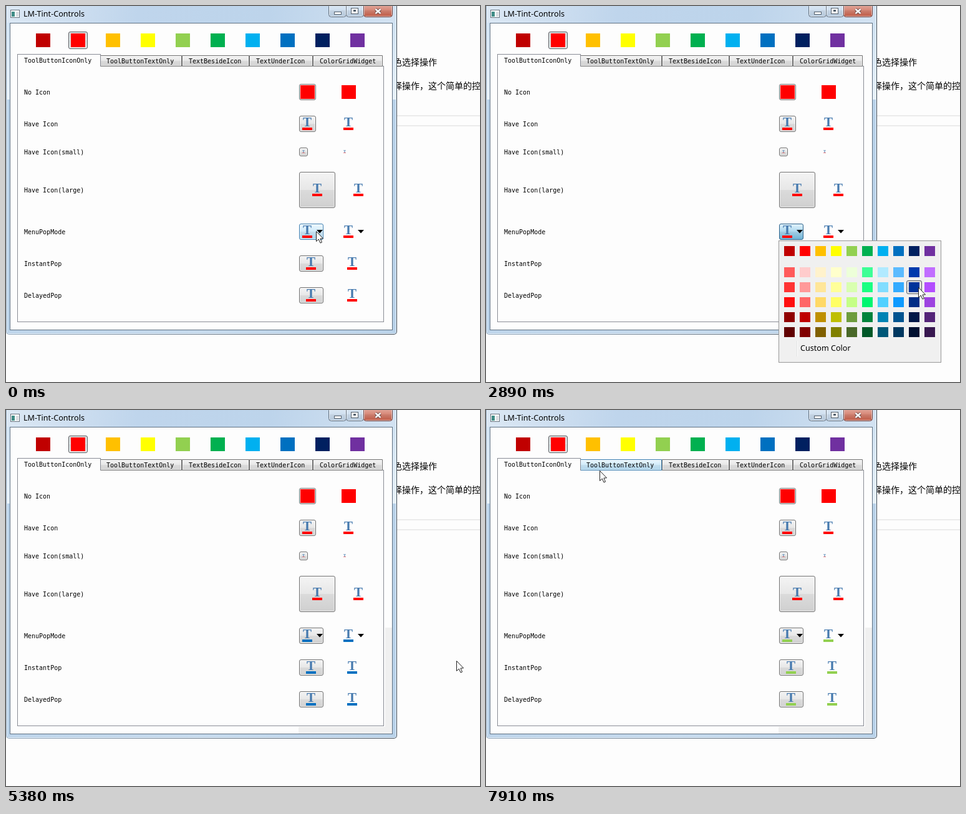
These frames come from a looping animation (760x603 px, 8000 ms). An HTML page with a canvas:

```html
<!DOCTYPE html>
<html lang="en">
<head>
<meta charset="utf-8">
<title>Color tool buttons</title>
<style>
html, body { margin: 0; width: 760px; height: 603px; overflow: hidden; background: #fdfdfd; }
canvas { display: block; }
</style>
</head>
<body>
<canvas id="stage" width="760" height="603"></canvas>
<script>
const c = document.getElementById('stage').getContext('2d');
const LOOP = 8000;
const MONO = '10px "DejaVu Sans Mono", monospace';
const SANS = '12.6px "Noto Sans", sans-serif';
const CJK = '14px "Noto Sans CJK SC", "Noto Sans CJK", sans-serif';

// ---- colours ----
const base = ['#c00000', '#ff0000', '#ffc000', '#ffff00', '#92d050',
  '#00b050', '#00b0f0', '#0070c0', '#002060', '#7030a0'];

// Scale the HSV value; overflow above full brightness lowers the saturation.
function shade(hex, factor) {
  const rgb = [1, 3, 5].map(i => parseInt(hex.slice(i, i + 2), 16));
  const max = Math.max(...rgb), min = Math.min(...rgb);
  let v = max * factor, s = 1 - min / max;
  if (v > 255) { s = Math.max(0, s - (v - 255) / 255); v = 255; }
  return `rgb(${rgb.map(k => Math.round(v * (1 - s * (max - k) / (max - min))))})`;
}
const grid = [1, 1.8, 1.6, 1.4, 0.75, 0.5].map(f => base.map(h => shade(h, f)));

// Edge, top and bottom colour of each control state.
const skins = {
  normal: ['#707070', '#f4f4f4', '#dadada'],
  hot: ['#3c7fb1', '#eef8fe', '#b2def8'],
  down: ['#2c628b', '#e5f4fc', '#72bce2'],
  flatHot: ['#b4b8bc', '#fdfdfd', '#f6f6f6'],
  flatDown: ['#5c6166', '#d8d8d8', '#f4f4f4'],
  caption: ['#5d6d7e', '#e0ebf6', '#bdd2e7'],
  close: ['#6a3a38', '#e5b3a8', '#c85a44']
};

// ---- layout: seven rows, 25 px apart ----
const rows = [['No Icon', 26], ['Have Icon', 26], ['Have Icon(small)', 14],
  ['Have Icon(large)', 58], ['MenuPopMode', 26], ['InstantPop', 26], ['DelayedPop', 26]]
  .map(([label, h]) => ({ label, h }));
rows.reduce((y, row) => { row.y = y; return y + row.h + 25; }, 125);
const [plain, medium, small, large, menu, instant, delayed] = rows;

// ---- timeline ----
// Pointer glides: first and last change, number of steps, end point, optional bend.
const glides = [
  [810, 810, 1, [503, 366]],
  [1240, 1240, 1, [512, 395]],
  [1380, 2200, 7, [632, 409], [490, 620]],
  [2320, 2750, 4, [693, 451]],
  [3040, 3040, 1, [686, 439]],
  [3470, 3750, 3, [566, 367]],
  [4450, 4840, 4, [711, 394], [620, 394]],
  [4990, 4990, 1, [727, 394]],
  [5380, 5380, 1, [722, 402]],
  [5530, 5930, 4, [562, 420]],
  [6490, 6920, 4, [648, 451], [590, 455]],
  [7070, 7490, 4, [345, 161]],
  [7640, 7910, 3, [182, 97]]
];

function pointerAt(t) {
  let at = [497, 361];
  for (const [first, last, steps, end, bend] of glides) {
    if (t < first) break;
    const gap = (last - first) / (steps - 1) || 1;
    const u = Math.min(steps, Math.floor((t - first) / gap + 0.01) + 1) / steps;
    at = at.map((from, i) => {
      const mid = bend ? bend[i] : (from + end[i]) / 2;
      return Math.round((1 - u) ** 2 * from + 2 * u * (1 - u) * mid + u * u * end[i]);
    });
  }
  return at;
}

const popups = [
  { row: menu, x: 470, press: 530, open: 670, pick: 2890, close: 3040, cell: [2, 8] },
  { row: menu, x: 535, press: 4060, open: 4180, pick: 5120, close: 5250, cell: [0, 7] },
  { row: instant, x: 535, press: 6070, open: 6190, pick: 7070, close: 7070, cell: [0, 4] }
];

// ---- drawing helpers ----
function fill(x, y, w, h, style) { c.fillStyle = style; c.fillRect(x, y, w, h); }

function frame(x, y, w, h, style) {
  c.strokeStyle = style; c.lineWidth = 1;
  c.strokeRect(x + 0.5, y + 0.5, w - 1, h - 1);
}

function ramp(x0, y0, x1, y1, ...colors) {
  const g = c.createLinearGradient(x0, y0, x1, y1);
  colors.forEach((color, i) => g.addColorStop(i / (colors.length - 1), color));
  return g;
}

function text(str, x, y, font, color = '#000', align = 'left') {
  c.font = font; c.fillStyle = color; c.textAlign = align;
  c.fillText(str, x, y);
}

function shape(points, color, edge) {
  c.beginPath();
  points.forEach(p => c.lineTo(...p));
  c.closePath();
  c.fillStyle = color; c.fill();
  if (edge) { c.strokeStyle = edge; c.lineWidth = 1; c.stroke(); }
}

// Glossy control: a vertical ramp with a darker lower half.
function button(x, y, w, h, skin, radius = 2.5) {
  const [edge, top, bottom] = skins[skin];
  c.beginPath(); c.roundRect(x + 0.5, y + 0.5, w - 1, h - 1, radius);
  c.fillStyle = ramp(0, y, 0, y + h, top, bottom); c.fill();
  const half = Math.floor(h / 2);
  fill(x + 1, y + half, w - 2, h - half - 1, 'rgba(0,0,0,.05)');
  if (skin !== 'down' && skin !== 'flatDown') frame(x + 1, y + 1, w - 2, h - 2, 'rgba(255,255,255,.6)');
  c.beginPath(); c.roundRect(x + 0.5, y + 0.5, w - 1, h - 1, radius);
  c.strokeStyle = edge; c.lineWidth = 1; c.stroke();
}

// Letter with an underline in the chosen colour; y is the top of the button.
function icon(cx, y, color) {
  text('T', cx, y + 17, 'bold 21px "Liberation Serif", serif', '#4579ae', 'center');
  fill(cx - 8, y + 19, 16, 4, color);
}

function tinyIcon(cx, y) {
  text('T', cx, y + 8, 'bold 6px "Liberation Serif", serif', '#4579ae', 'center');
  fill(cx - 2, y + 8, 4, 1, '#f08080');
}

// ---- scene parts ----
function page() {
  fill(0, 0, 760, 603, '#fdfdfd');
  text('色选择操作', 621, 95, CJK);
  text('择操作，这个简单的控', 621, 133, CJK);
  for (const y of [175, 191]) fill(627, y, 133, 2, '#ebebeb');
}

function windowFrame(repainted) {
  c.beginPath(); c.roundRect(0, -8, 627, 535, 5);
  c.fillStyle = ramp(0, 0, 627, 0, '#8fa5ba', '#3e4a56'); c.fill();
  c.beginPath(); c.roundRect(1, -8, 625, 534, 4);
  c.fillStyle = '#e8f2fb'; c.fill();
  fill(2, 0, 623, 150, ramp(0, 0, 0, 150, '#cbdff1', '#e9f2fa'));
  fill(2, 150, 623, 375, '#b9d2e9');
  fill(2, 0, 623, 27, ramp(0, 0, 625, 90, '#dce8f4', '#bfd5ec', '#bdd4eb', '#d4e3f2'));
  fill(2, 520, 623, 5, ramp(0, 0, 625, 0, '#bdd4ea', '#c6daed', '#b9d2e9'));
  fill(6, 27, 614, 493, '#5f7183');
  fill(7, 28, 612, 491, '#fdfdfd');
  if (repainted) {
    fill(608, 349, 11, 170, '#f0f0f0');
    fill(469, 508, 150, 11, '#f0f0f0');
  }

  fill(7, 6, 15, 13, '#fff');
  frame(7, 6, 15, 13, '#66727d');
  fill(9, 9, 5, 8, '#3f8c86');
  fill(16, 9, 4, 8, '#d9dde1');
  text('LM-Tint-Controls', 28, 17, SANS);

  button(517, -4, 29, 22, 'caption', 4);
  button(545, -4, 29, 22, 'caption', 4);
  button(573, -4, 47, 22, 'close', 4);
  fill(526, 9, 12, 5, '#53606d');
  fill(527, 10, 10, 3, '#fff');
  fill(553, 3, 12, 10, '#53606d');
  fill(554, 4, 10, 8, '#fff');
  fill(557, 6, 4, 3, '#53606d');
  for (const [color, width] of [['#6b4a4a', 4.4], ['#fff', 2.4]]) {
    c.beginPath();
    c.moveTo(592.5, 5); c.lineTo(600.5, 12);
    c.moveTo(600.5, 5); c.lineTo(592.5, 12);
    c.strokeStyle = color; c.lineWidth = width; c.stroke();
  }
}

function swatchRow() {
  button(100, 41, 31, 28, 'flatDown');
  base.forEach((color, i) => fill(48 + 56 * i, 44, 23, 22, color));
}

function tabs(px, py) {
  frame(18, 96, 588, 411, '#898c95');
  let x = 150;
  for (const label of ['ToolButtonTextOnly', 'TextBesideIcon', 'TextUnderIcon', 'ColorGridWidget']) {
    const w = Math.min(6 * label.length + 24, 604 - x);
    const hot = px >= x && px < x + w && py >= 79 && py <= 97;
    button(x, 79, w, 18, hot ? 'hot' : 'normal', 0);
    text(label, x + 11, 92, MONO);
    x += w;
  }
  fill(18, 77, 134, 20, '#898c95');
  fill(19, 78, 132, 20, '#fdfdfd');
  text('ToolButtonIconOnly', 29, 91, MONO);
}

function controls(t, px, py, color) {
  rows.forEach(({ label, y, h }) => text(label, 29, y + h / 2 + 4, MONO));

  button(470, plain.y, 27, 26, 'normal');
  for (const x of [472, 538]) fill(x, plain.y + 2, 23, 22, base[1]);
  button(470, medium.y, 27, 26, 'normal');
  for (const x of [483, 549]) icon(x, medium.y, base[1]);
  button(470, small.y, 14, 14, 'normal');
  for (const x of [477, 543]) tinyIcon(x, small.y);
  button(470, large.y, 58, 58, 'normal');
  for (const x of [499, 565]) icon(x, large.y + 16, base[1]);

  for (const row of [menu, instant, delayed]) {
    for (const [x, w] of [[470, 39], [535, 41]]) {
      const { y } = row, flat = x > 500;
      const over = px >= x && px < x + w && py >= y && py < y + 26;
      const down = popups.some(p => p.row === row && p.x === x && t >= p.press && t < p.close);
      if (down) button(x, y, w, 26, flat ? 'flatDown' : 'down');
      else if (over) button(x, y, w, 26, flat ? 'flatHot' : 'hot');
      else if (!flat) button(x, y, w, 26, 'normal');
      icon(x + (row === menu ? 13 : 19) + flat, y, color);
      const ax = x + 28 + flat, ay = y + 10;
      if (row === menu) shape([[ax, ay], [ax + 10, ay], [ax + 5, ay + 5.5]], '#000');
    }
  }
}

function popup(p, t, px, py) {
  const x = p.x === 470 ? 469 : p.x, y = p.row.y + 27;
  const previous = popups[popups.indexOf(p) - 1];
  const chosen = t >= p.pick ? [p, previous] : [previous];
  fill(x, y, 261, 196, '#f0f0f0');
  frame(x, y, 261, 196, '#979797');
  grid.forEach((line, r) => line.forEach((color, i) => {
    const cx = x + 17 + 25 * i, cy = y + 17 + (r && 10 + 24 * r);
    const over = Math.abs(px - cx) <= 12 && Math.abs(py - cy) <= 11;
    const down = chosen.some(q => q && q.cell[0] === r && q.cell[1] === i);
    if (down || over) button(cx - 12, cy - 11, 25, 22, down ? 'flatDown' : 'flatHot');
    fill(cx - 8, cy - 8, 17, 16, color);
  }));
  fill(x + 29, y + 161, 1, 25, '#e2e3e3');
  fill(x + 30, y + 161, 1, 25, '#fff');
  text('Custom Color', x + 35, y + 177, SANS);
}

function cursor(x, y) {
  const outline = [[0, 0], [0, 16], [3.8, 12.6], [6.5, 18.6], [9, 17.5], [6.4, 11.6], [11, 11.4]];
  shape(outline.map(([dx, dy]) => [x + 0.5 + dx, y + 0.5 + dy]), '#fff', '#222');
}

function draw(t) {
  const [px, py] = pointerAt(t);
  const done = popups.findLast(p => t >= p.close);
  const color = done ? grid[done.cell[0]][done.cell[1]] : base[1];
  const open = popups.find(p => t >= p.open && t < p.close);
  page();
  windowFrame(done);
  swatchRow();
  tabs(px, py);
  controls(t, px, py, color);
  if (open) popup(open, t, px, py);
  cursor(px, py);
}

const start = performance.now();
function tick() {
  draw((performance.now() - start) % LOOP);
  requestAnimationFrame(tick);
}
tick();
</script>
</body>
</html>
```
